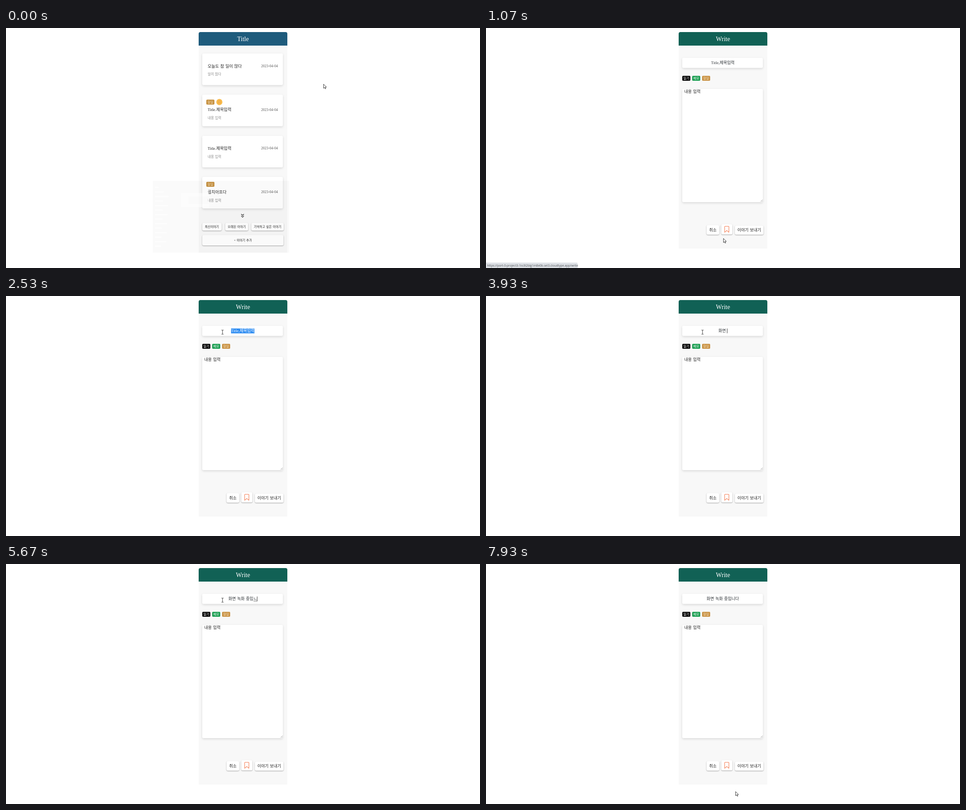
These frames come from a looping animation (1053 by 532 pixels, 8000 ms). An HTML page:

```html
<!DOCTYPE html>
<html>
<head>
<meta charset="utf-8">
<title>Write</title>
<style>
  html, body { margin: 0; width: 100%; height: 100%; overflow: hidden; background: #fff; }
  svg { display: block; width: 1053px; height: 532px; }
  text {
    font-family: "Liberation Serif", "Noto Sans CJK KR", "Noto Sans CJK", serif;
    word-spacing: .7px;
    white-space: pre;
  }
  .url { font-family: "Open Sans", "Noto Sans", sans-serif; word-spacing: 0; }
  .card { filter: drop-shadow(0 2px 2.5px rgba(0, 0, 0, .13)); }
  .btn { filter: drop-shadow(0 1.5px 1.2px rgba(0, 0, 0, .34)); }
</style>
</head>
<body>
<svg id="stage" viewBox="0 0 1053 532">
  <defs><clipPath id="selClip"><rect id="selBox" y="71" height="13"/></clipPath></defs>
  <g id="list"></g>
  <g id="write"></g>
  <g id="status"></g>
  <g id="cursor">
    <path data-kind="arrow" d="M.5.5v9.2l2.2-2 1.5 3.2 1.4-.6-1.5-3.2h2.9z"
          fill="#fff" stroke="#111" stroke-width=".8" stroke-linejoin="round"/>
    <path data-kind="beam" d="M-2.3-4.5h1.5l.8.6.8-.6h1.5M0-4v8.2M-2.3 4.8h1.5l.8-.6.8.6h1.5"
          fill="none" stroke="#222" stroke-width=".9"/>
    <path data-kind="hand" d="M-1 1q0-1 1-1t1 1v4l3.6.8q1.4.4 1.4 1.8 0 2.4-1 4v1.6h-5v-1.4q-1.6-1.6-3-4.4-.5-1.2.4-1.5.8-.1 1.6 1.2z"
          fill="#fff" stroke="#111" stroke-width=".8" stroke-linejoin="round"/>
  </g>
</svg>
<script>
const $ = id => document.getElementById(id);
const LOOP = 8000, STEP = 1000 / 15;
const LEFT = 436, MID = 526, WIDE = 179;

function add(parent, tag, attrs, content) {
  const el = document.createElementNS("http://www.w3.org/2000/svg", tag);
  for (const k in attrs) el.setAttribute(k, attrs[k]);
  if (content) el.textContent = content;
  parent.appendChild(el);
  return el;
}
const box = (g, x, y, width, height, fill, more) =>
  add(g, "rect", { x, y, width, height, fill, ...more });
const label = (g, x, y, size, fill, str, anchor = "start") =>
  add(g, "text", { x, y, "font-size": size, fill, "text-anchor": anchor }, str);

function panel(g, bottom, color, title) {
  box(g, 428, 30, 197, bottom - 30, "#f8f8f8");
  add(g, "path", { d: "M428 39V13q0-4 4-4h189q4 0 4 4v26z", fill: color });
  label(g, MID + .5, 28.6, 14, "#fff", title, "middle");
}
function tag(g, x, y, color, str, ink = "#fff") {
  box(g, x, y, 18, 11, color, { rx: 2 });
  label(g, x + 9, y + 8.1, 7, ink, str, "middle");
}
function button(g, x, y, w, h, str, size) {
  box(g, x, y, w, h, "#fff", { rx: 3, class: "btn" });
  if (str) label(g, x + w / 2, y + h / 2 + size * .37, size, "#222", str, "middle");
}
const bookmark = (g, x, y, w, h, stroke, line) => add(g, "path", {
  d: `M${x} ${y + 1}q0-1 1-1h${w - 2}q1 0 1 1v${h - 1}l${-w / 2}-${w * .42}-${w / 2} ${w * .42}z`,
  fill: "none", stroke, "stroke-width": line, "stroke-linejoin": "round"
});

// List page
const list = $("list");
panel(list, 498, "#1e5b7c", "Title");
[
  ["오늘도 참 일이 많다", "일이 많다"],
  ["Title.제목입력", "내용 입력", true, true],
  ["Title.제목입력", "내용 입력"],
  ["골치아프다", "내용 입력", true]
].forEach(([title, body, todo, marked], i) => {
  const y = 56.5 + i * 91.2, mid = y + (todo ? 33.3 : 27.6);
  box(list, LEFT, y, WIDE, 70, "#fff", { rx: 3, class: "card" });
  if (todo) tag(list, 445, y + 11, "#c5903f", "할일", "#f7e3c4");
  if (marked) {
    add(list, "circle", { cx: 474, cy: y + 16.4, r: 6.8, fill: "#f8bb4c" });
    bookmark(list, 472, y + 13.5, 4.4, 6, "#e79a45", .7);
  }
  label(list, 448, mid + 3.4, 9.1, "#222", title);
  label(list, 604, mid + 2.8, 8, "#555", "2023-04-04", "end");
  label(list, 448, mid + 21.2, 7.5, "#888", body);
});
add(list, "path", {
  d: "M522.5 412.5l3 3 3-3M522.5 416.3l3 3 3-3",
  fill: "none", stroke: "#222", "stroke-width": 1.2
});
const links = [
  [436, 432, 43, 17, "최신이야기"],
  [487, 432, 51, 17, "오래된 이야기"],
  [545, 432, 72, 17, "기억하고 싶은 이야기"],
  [436, 459, 180.5, 23, "+ 이야기 추가"]
];
links.forEach(b => button(list, ...b, 6.8));

// Faint window fading out over the list
box(list, 326, 339, 303, 159, "rgba(0,0,0,.018)");
box(list, 389, 366, 62, 31, "rgba(255,255,255,.55)");
box(list, 405, 373, 46, 17, "rgba(0,0,0,.006)");
for (let i = 0; i < 14; i++)
  box(list, 331, 352 + i * 10, 8 + (i * 11) % 23, 3, "rgba(255,255,255,.45)");

// Write page
const write = $("write");
panel(write, 489, "#116155", "Write");
box(write, LEFT, 66, WIDE, 22.5, "#fff", { rx: 3, class: "card" });
tag(write, 436, 106, "#080808", "일기");
tag(write, 458, 106, "#1fa055", "메모");
tag(write, 480, 106, "#c99346", "할일", "#f7e3c4");
box(write, LEFT, 135, WIDE, 251, "#fff", { rx: 3, class: "card" });
label(write, 440.5, 144.2, 9, "#222", "내용 입력");
add(write, "path", { d: "M610 385l4.5-4.5M612.6 385l2-2", stroke: "#888", "stroke-width": .7 });
const actions = [
  [490, 437, 28, 21, "취소"],
  [522.5, 435, 25, 22.5, ""],
  [553, 438, 63.5, 20, "이야기 보내기"]
];
actions.forEach(b => button(write, ...b, 9));
bookmark(write, 530.2, 439.5, 9.4, 13.3, "#f47b50", 1.1);

const field = label(write, 0, 80.4, 9, "#2a2f33", "");
const selBack = box(write, 0, 72, 0, 10.8, "#2f8df2");
const selText = label(write, 0, 80.4, 9, "#fff", "");
selText.setAttribute("clip-path", "url(#selClip)");
const under = box(write, 0, 81.6, 0, .8, "#333");
const caret = box(write, 0, 72, .9, 10.5, "#222");

// Link address at the bottom left
const status = $("status");
box(status, -3, 520, 206.5, 15, "#dee1e6", { rx: 2 });
label(status, 2.5, 528.8, 6.6, "#50555b",
  "https://port-0-project3-1io3t2blg1m8e0b.sel3.cloudtype.app/write").setAttribute("class", "url");

// Time, x, y of the pointer
const path = [
  [0, 705, 124], [130, 630, 126], [200, 630, 126], [330, 608, 190], [470, 570, 330],
  [600, 540, 435], [670, 529, 468], [730, 519, 475], [930, 520, 474], [1070, 527, 466],
  [1200, 535, 390], [1400, 549, 220], [1530, 556, 115], [1670, 559, 81], [1730, 559, 80],
  [1800, 556, 80], [2130, 520, 80], [2400, 488, 80], [2530, 481, 80], [6400, 481, 80],
  [6670, 476, 86], [6870, 478, 98], [7070, 489, 107], [7270, 497, 108.5], [7330, 497, 109],
  [7530, 498, 110.5], [7670, 498, 110.5], [7800, 520, 300], [7870, 545, 440], [7930, 554, 504],
  [8000, 554, 504]
];
const typed = [
  [0, "Title,제목입력"], [3330, "ㅎ"], [3470, "호"], [3530, "화"], [3670, "화ㅁ"],
  [3730, "화며"], [3870, "화면"], [3930, "화면 "], [4070, "화면 ㄴ"], [4130, "화면 노"],
  [4270, "화면 녹"], [4470, "화면 녹ㅎ"], [4530, "화면 녹호"], [4670, "화면 녹화"],
  [4870, "화면 녹화 "], [4930, "화면 녹화 ㅈ"], [5070, "화면 녹화 주"], [5130, "화면 녹화 중"],
  [5330, "화면 녹화 중ㅇ"], [5470, "화면 녹화 중이"], [5530, "화면 녹화 중입"],
  [5670, "화면 녹화 중입ㄴ"], [5730, "화면 녹화 중입니"], [5870, "화면 녹화 중입니ㄷ"],
  [5930, "화면 녹화 중입니다"]
];
const OPEN = 1000, HOVER = 930, LEAVE = 1530, TYPE = 3330, BLUR = 7400;

function pointer(t) {
  const i = Math.max(1, path.findIndex(p => p[0] >= t));
  const [t0, x0, y0] = path[i - 1], [t1, x1, y1] = path[i];
  const k = (t - t0) / (t1 - t0);
  return [x0 + (x1 - x0) * k, y0 + (y1 - y0) * k];
}
const inside = (x, y) => ([l, t, w, h]) => x >= l && x <= l + w && y >= t && y <= t + h;
const fields = [[LEFT, 66, WIDE, 23], [LEFT, 135, WIDE, 251]];
const tags = [436, 458, 480].map(x => [x, 106, 18, 11]);

function pointerKind(x, y, writing) {
  const hit = inside(x, y);
  if ((writing ? [...tags, ...actions] : links).some(hit)) return "hand";
  return writing && fields.some(hit) ? "beam" : "arrow";
}
const show = (el, on) => { el.style.display = on ? "" : "none"; };
const set = (el, attrs) => { for (const k in attrs) el.setAttribute(k, attrs[k]); };

function drawField(t, px) {
  const str = typed.filter(s => s[0] <= t).pop()[1];
  if (field.textContent !== str) field.textContent = selText.textContent = str;
  const w = field.getComputedTextLength(), x = MID - w / 2, end = x + w;
  set(field, { x });
  set(selText, { x });

  const selecting = t >= 1800 && t < TYPE;
  let from = end;
  if (selecting) {
    for (let i = str.length - 1; i >= 0; i--) {
      const left = i ? x + field.getSubStringLength(0, i) : x;
      if (px > (left + from) / 2) break;
      from = left;
    }
  }
  const span = { x: from, width: end - from };
  set(selBack, span);
  set($("selBox"), span);
  show(selBack, selecting);
  show(selText, selecting);

  const focused = t >= TYPE && t < BLUR;
  show(caret, focused && !(t >= 6470 && t < 6970));
  set(caret, { x: end - .4 });
  show(under, focused && !str.endsWith(" "));
  set(under, { x: end - 8.2, width: 8.2 });
}

function draw(now) {
  const t = Math.round(Math.floor((now % LOOP) / STEP + .1) * STEP / 10) * 10 % LOOP;
  const writing = t >= OPEN;
  const [x, y] = pointer(t);
  show(list, !writing);
  show(write, writing);
  show(status, t >= HOVER && t < LEAVE);
  if (writing) drawField(t, x);
  const kind = pointerKind(x, y, writing);
  $("cursor").setAttribute("transform", `translate(${Math.round(x)} ${Math.round(y)})`);
  for (const el of $("cursor").children) show(el, el.dataset.kind === kind);
}

const start = performance.now();
function tick() {
  draw(performance.now() - start);
  requestAnimationFrame(tick);
}
tick();
</script>
</body>
</html>
```
